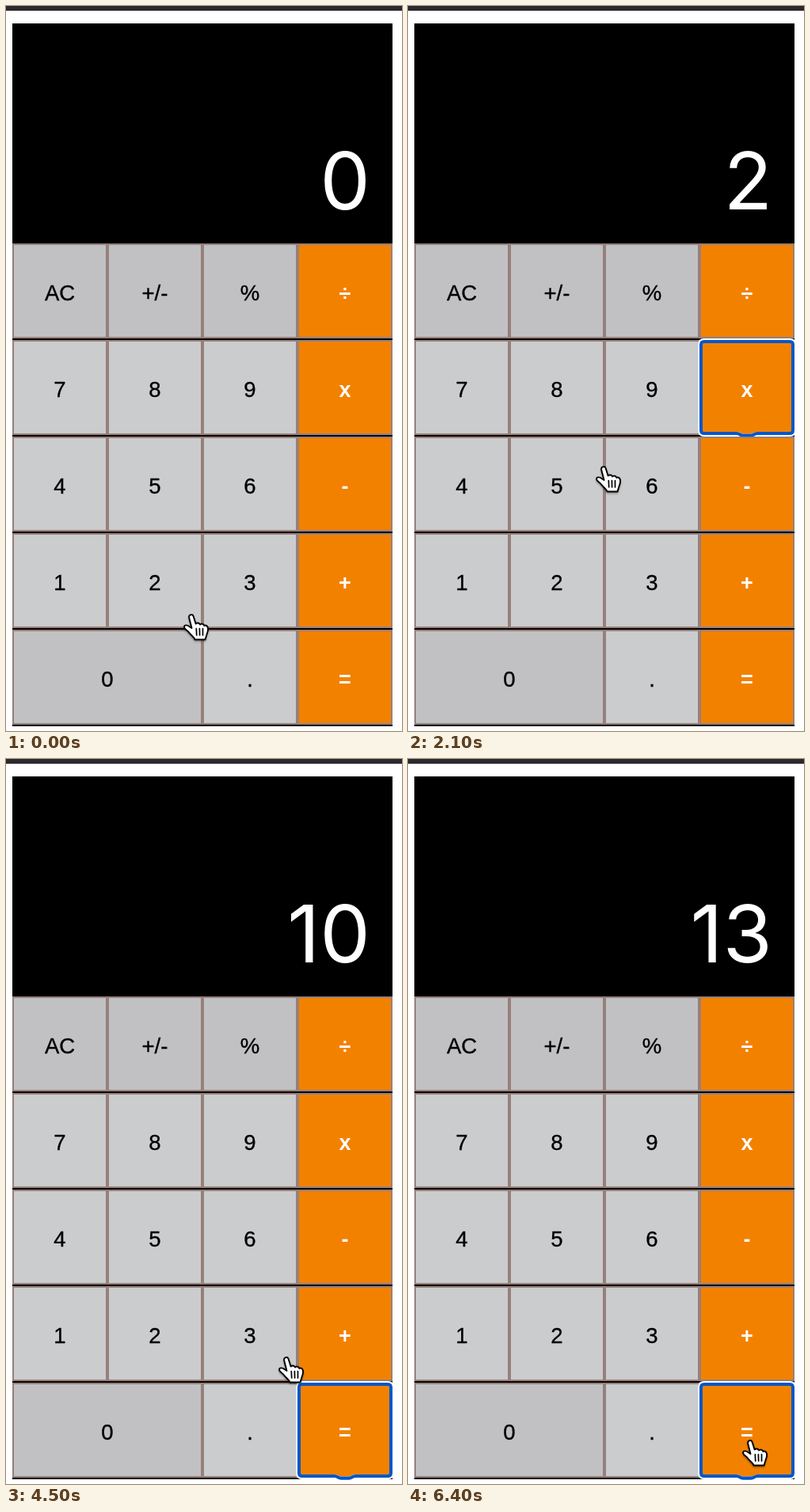
These frames come from a looping animation (500 by 916 pixels, 8400 ms). An HTML page:

```html
<!DOCTYPE html>
<html lang="en">
<head>
<meta charset="utf-8">
<title>Calculator</title>
<style>
  html, body { margin: 0; width: 100%; height: 100%; overflow: hidden; background: #fff; }
  svg { display: block; width: 500px; height: 916px; }
  text { font-family: "Liberation Sans", Arial, sans-serif; }
  .key { stroke: #97807b; stroke-width: 2; }
  .number { fill: #cbccce; }
  .wide, .function { fill: #c1c1c3; }
  .operator { fill: #f38100; }
  .label { font-size: 27.5px; text-anchor: middle; stroke: #000; stroke-width: .35; }
  .label.operator { fill: #fff; font-weight: bold; font-size: 27px; stroke: none; }
  #display { font: 101px Inter, sans-serif; text-anchor: end; fill: #fff; }
  #ring path { fill: none; }
</style>
</head>
<body>
<svg viewBox="0 0 500 916">
  <defs>
    <filter id="shadow" x="-30%" y="-30%" width="160%" height="170%">
      <feDropShadow dx="0" dy="1.5" stdDeviation="1.2" flood-opacity=".35"/>
    </filter>
  </defs>
  <rect width="500" height="6" fill="#2c2a2f"/>
  <rect x="8" y="22" width="480" height="888"/>
  <text id="display" x="460" y="256.5"></text>
  <g id="keys"></g>
  <g id="ring">
    <path id="halo" stroke="#fff" stroke-width="6"/>
    <path id="outline" stroke="#0457c8" stroke-width="4"/>
  </g>
  <g id="cursor" filter="url(#shadow)" stroke="#000" stroke-linecap="round" stroke-linejoin="round">
    <path fill="#fff" stroke-width="1.9" d="M1.5 18L-1.8 5C-2.6 .8 2.4 -.5 3.6 3L6.6 12.5C8 11 11 11 12 13.5C13.5 12 16.5 12.5 17.3 15C19 13.8 21.5 15 22 18C22.5 22 20.8 24.5 20 27.5L18.5 32.5H5.5C4.5 29 .5 27 -2 23.5C-4 20.5 -8 19.5 -8 16.5C-7.8 13.5 -4 14 -1.5 16Z"/>
    <path fill="none" stroke-width="1.7" d="M7.3 18.5L7.7 27M11.4 18.5L11.6 27M15.5 18.5V27"/>
  </g>
</svg>
<script>
const DURATION = 8400, STEP = 100, SIZE = 120, PITCH = 122;
const $ = id => document.getElementById(id);

const rows = [
  ["AC", "+/-", "%", "÷"],
  ["7", "8", "9", "x"],
  ["4", "5", "6", "-"],
  ["1", "2", "3", "+"],
  ["0", null, ".", "="]
];

const keys = {};
rows.forEach((row, r) => row.forEach((label, c) => {
  if (!label) return;
  const width = label === "0" ? 2 * SIZE : SIZE;
  const kind = c === 3 ? "operator" : r === 0 ? "function" : label === "0" ? "wide" : "number";
  const key = document.createElementNS("http://www.w3.org/2000/svg", "g");
  key.setAttribute("transform", `translate(${8 + c * SIZE} ${300 + r * PITCH})`);
  key.innerHTML =
    `<rect class="key ${kind}" x="1" y="1" width="${width - 2}" height="${SIZE - 2}"/>` +
    `<text class="label ${c === 3 ? kind : ""}" x="${width / 2}" y="72">${label}</text>`;
  keys[label] = $("keys").appendChild(key);
}));

// Rounded outline with a small dip at the middle of its lower edge.
function ringPath(inset, r) {
  const a = inset, b = SIZE - inset, mid = SIZE / 2, side = b - a - 2 * r, low = b + 2.8;
  return `M${a + r} ${a}h${side}q${r} 0 ${r} ${r}v${side}q0 ${r} ${-r} ${r}` +
    `H${mid + 13}C${mid + 9} ${b} ${mid + 9} ${low} ${mid + 5} ${low}` +
    `H${mid - 5}C${mid - 9} ${low} ${mid - 9} ${b} ${mid - 13} ${b}` +
    `H${a + r}q${-r} 0 ${-r} ${-r}v${-side}q0 ${-r} ${r} ${-r}z`;
}
$("halo").setAttribute("d", ringPath(1, 4.5));
$("outline").setAttribute("d", ringPath(2, 4));

// Pointer moves; a key is pressed on arrival.
const home = { x: 233, y: 768 };
const moves = [
  { leave: 0, arrive: 700, x: 173, y: 731, key: "2" },
  { leave: 900, arrive: 1600, x: 425, y: 480, key: "x" },
  { leave: 1800, arrive: 2400, x: 186, y: 615, key: "5" },
  { leave: 2600, arrive: 2800, x: 335, y: 720 },
  { leave: 3000, arrive: 3100, x: 452, y: 864 },
  { leave: 3100, arrive: 3400, x: 427, y: 846, key: "=" },
  { leave: 3800, arrive: 3900, x: 404, y: 848 },
  { leave: 3900, arrive: 4100, x: 225, y: 815 },
  { leave: 4300, arrive: 4800, x: 425, y: 721, key: "+" },
  { leave: 5200, arrive: 5500, x: 305, y: 732, key: "3" },
  { leave: 5600, arrive: 5900, x: 431, y: 860, key: "=" }
];
const presses = moves.filter(move => move.key);

const easeOut = k => 1 - (1 - k) ** 2;

function pointer(t) {
  let { x, y } = home;
  for (const move of moves) {
    const progress = (t - move.leave) / (move.arrive - move.leave);
    const k = easeOut(Math.min(1, Math.max(0, progress)));
    x += (move.x - x) * k;
    y += (move.y - y) * k;
  }
  return [x, y].map(Math.round);
}

const operations = { "x": (a, b) => a * b, "+": (a, b) => a + b };

// The sum so far, with each press taking effect on release.
function readout(t) {
  let shown = 0, stored = 0, pending = null;
  for (const { key, arrive } of presses) {
    if (t < arrive + STEP) break;
    if (key === "=") shown = operations[pending](stored, shown);
    else if (operations[key]) [stored, pending] = [shown, key];
    else shown = Number(key);
  }
  return shown;
}

// Placed right after its key, so that later keys cover its outer edge.
function focusKey(t) {
  const press = presses.filter(({ arrive }) => arrive <= t).pop();
  $("ring").style.display = press ? "" : "none";
  if (!press) return;
  const key = keys[press.key];
  key.after($("ring"));
  $("ring").setAttribute("transform", key.getAttribute("transform"));
}

function render(t) {
  $("display").textContent = readout(t);
  focusKey(t);
  $("cursor").setAttribute("transform", `translate(${pointer(t).join(" ")})`);
}

const start = performance.now();
function frame() {
  const t = (performance.now() - start) % DURATION;
  render(Math.floor(t / STEP) * STEP);
  requestAnimationFrame(frame);
}
frame();
</script>
</body>
</html>
```
